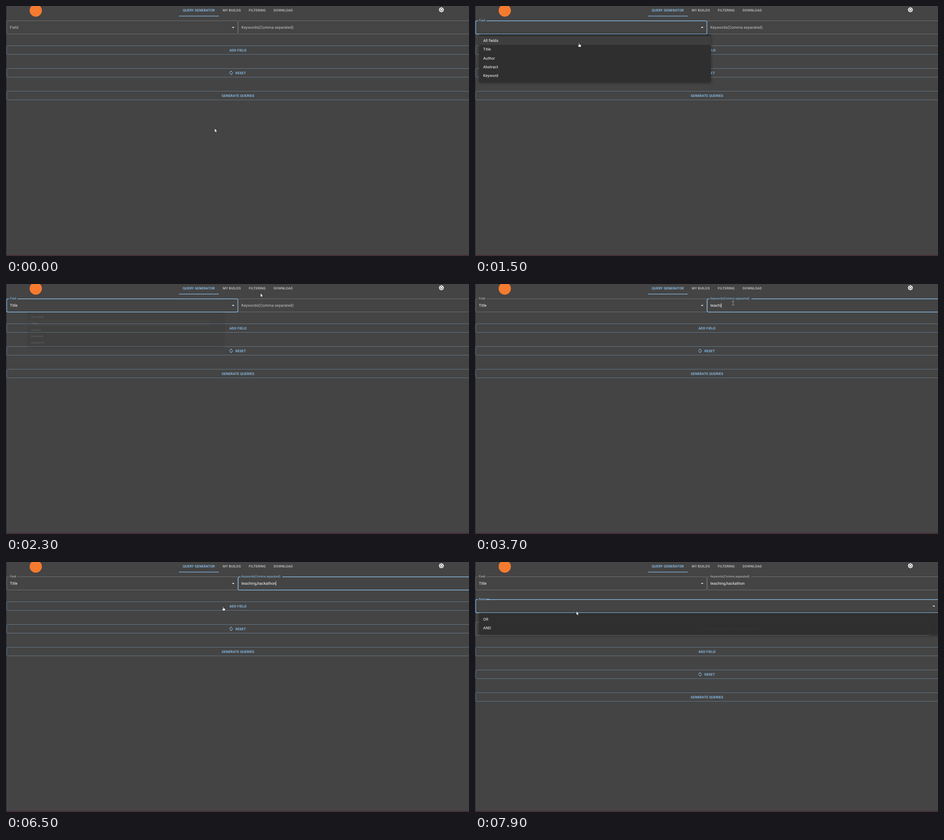
Write an HTML page that moves like this. It is 1019 px wide and 550 px high and loops after 8 s.

```html
<!DOCTYPE html>
<html lang="en">
<head>
<meta charset="utf-8">
<title>Query generator</title>
<style>
  html, body { margin: 0; width: 100%; height: 100%; overflow: hidden; background: #444; }
  svg { display: block; width: 1019px; height: 550px; }
  text { font-family: Roboto, sans-serif; font-size: 8.54px; letter-spacing: .00938em; text-rendering: geometricPrecision; }
  .caps { font-size: 7.47px; font-weight: 500; letter-spacing: .02857em; }
</style>
</head>
<body>
<svg id="stage" viewBox="0 0 1019 550"></svg>
<script>
const LOOP = 8000, STEP = 100, UNIT = .5335;
const BLUE = '#90caf9', GREY = '#c6c6c6', LINE = '#727272', BUTTON_LINE = '#647888';
const stage = document.getElementById('stage');

const ICONS = {
  brightness: 'M20 8.69V4h-4.69L12 .69 8.69 4H4v4.69L.69 12 4 15.31V20h4.69L12 23.31 15.31 20H20v-4.69L23.31 12 20 8.69zM12 18c-3.31 0-6-2.69-6-6s2.69-6 6-6 6 2.69 6 6-2.69 6-6 6zm0-10c-2.21 0-4 1.79-4 4s1.79 4 4 4 4-1.79 4-4-1.79-4-4-4z',
  renew: 'M12 6v3l4-4-4-4v3c-4.42 0-8 3.58-8 8 0 1.57.46 3.03 1.24 4.26L6.7 14.8c-.45-.83-.7-1.79-.7-2.8 0-3.31 2.69-6 6-6zm6.76 1.74L17.3 9.2c.44.84.7 1.79.7 2.8 0 3.31-2.69 6-6 6v-3l-4 4 4 4v-3c4.42 0 8-3.58 8-8 0-1.57-.46-3.03-1.24-4.26z',
  trash: 'M6 19c0 1.1.9 2 2 2h8c1.1 0 2-.9 2-2V7H6v12zM19 4h-3.5l-1-1h-5l-1 1H5v2h14V4z',
  drop: 'M7 10l5 5 5-5z'
};

const CURSORS = {
  arrow: '<path d="M0 0V9L2 7.2 3.3 10 4.8 9.4 3.6 6.6H6.2Z" fill="#fff" stroke="#111" stroke-width=".7"/>',
  hand: '<path d="M-.9.6Q0-.6.9.6V3.6L4 4.4Q5 4.8 4.8 6L4 9.2H-.6L-3.2 5.8Q-2.8 4.6-.9 6Z" fill="#fff" stroke="#111" stroke-width=".7"/>',
  beam: '<path d="M-2.6-4.3Q0-4.3 0-3.2Q0-4.3 2.6-4.3M0-3.4V3.6M-2.6 4.5Q0 4.5 0 3.4Q0 4.5 2.6 4.5" fill="none" stroke="#b4b4b4" stroke-width=".9"/>'
};

// time, x, y, pointer shape
const POINTER = [
  [0, 459, 269, 'arrow'], [500, 459, 269, 'arrow'], [600, 330, 165, 'arrow'], [700, 226, 47, 'hand'],
  [1000, 226, 47, 'hand'], [1100, 226, 48, 'arrow'], [1300, 227, 60, 'arrow'], [1400, 228, 72, 'hand'],
  [1500, 229, 81, 'hand'], [1600, 230, 91, 'hand'], [1700, 230, 95, 'hand'], [2000, 230, 95, 'hand'],
  [2100, 260, 88, 'arrow'], [2200, 440, 48, 'arrow'], [2300, 560, 20, 'arrow'], [2500, 560, 20, 'arrow'],
  [2600, 564, 29, 'arrow'], [2700, 567, 39, 'beam'], [2800, 568, 42, 'beam'], [5800, 568, 42, 'beam'],
  [5900, 544, 94, 'hand'], [6000, 541, 120, 'arrow'], [6100, 536, 168, 'arrow'], [6300, 514, 150, 'hand'],
  [6400, 492, 116, 'arrow'], [6500, 478, 98, 'hand'], [6600, 474, 96, 'hand'], [7000, 474, 96, 'hand'],
  [7500, 223, 98, 'hand'], [7600, 223, 98, 'hand'], [7700, 223, 103, 'hand'], [7800, 223, 108, 'arrow']
];

// time, number of characters
const TYPED = [
  [0, 0], [3200, 1], [3300, 2], [3400, 3], [3500, 4], [3600, 5], [3700, 6], [3900, 7], [4000, 8], [4100, 10],
  [4300, 12], [4500, 13], [4800, 12], [4900, 13], [5000, 15], [5200, 16], [5300, 17], [5400, 18]
];

const clamp = v => Math.max(0, Math.min(1, v));
const ramp = (t, from, to) => clamp((t - from) / (to - from));
const easeOut = p => 1 - (1 - p) ** 2;
const within = (t, from, to) => t >= from && t < to;
const latest = (keys, t) => keys.filter(k => k[0] <= t).pop();

function pointerAt(t) {
  const a = latest(POINTER, t), b = POINTER[POINTER.indexOf(a) + 1] || a;
  const p = a === b ? 0 : ramp(t, a[0], b[0]);
  return { x: a[1] + (b[1] - a[1]) * p, y: a[2] + (b[2] - a[2]) * p, shape: a[3] };
}

const text = (x, y, s, fill = '#fff', attrs = '') => `<text x="${x}" y="${y}" fill="${fill}" ${attrs}>${s}</text>`;
const caps = (x, y, s, fill, attrs = '') => text(x, y, s, fill, `class="caps" ${attrs}`);
const rect = (x, y, w, h, fill, attrs = '') => `<rect x="${x}" y="${y}" width="${w}" height="${h}" fill="${fill}" ${attrs}/>`;
const icon = (name, cx, cy, fill, scale = UNIT, turn = 0) =>
  `<path d="${ICONS[name]}" fill="${fill}" transform="translate(${cx} ${cy}) rotate(${turn}) scale(${scale}) translate(-12 -12)"/>`;

// Outlined input whose label shrinks into a notch of the border.
function field({ x, right, cy, label, notch, value = '', shrink = 0, gap = shrink, focus, hover, select, open }) {
  const top = cy - 14.5, left = x + 5;
  const color = focus ? BLUE : hover ? '#e6e6e6' : LINE;
  const border = `M${left + notch * gap} ${top}H${right - 2}q2 0 2 2v25q0 2-2 2H${x + 2}q-2 0-2-2v-25q0-2 2-2H${left}`;
  return `<path d="${border}" fill="none" stroke="${color}" stroke-width="${focus ? 1.25 : 1}"/>`
    + text(x + 7, cy + 3 - 15.6 * shrink, label, focus ? BLUE : GREY, `style="font-size:${8.54 - 2.14 * shrink}px"`)
    + text(x + 7, cy + 3.4, value, '#fff', 'class="value"')
    + (select ? icon('drop', right - 10.2, cy + (open ? -.1 : .2), '#fff', UNIT, open ? 180 : 0) : '');
}

function button(cy, label, hover) {
  const reset = label === 'RESET';
  return rect(1.5, cy - 9.5, 1020, 19, hover ? 'rgba(144,202,249,.08)' : 'none', `rx="2" stroke="${hover ? BLUE : BUTTON_LINE}"`)
    + (reset ? icon('renew', 495.4, cy, BLUE, .4446) : '')
    + (reset ? caps(505, cy + 2.7, label, BLUE) : caps(510.6, cy + 2.7, label, BLUE, 'text-anchor="middle"'));
}

function menu({ top, width, items, active = -1, activeWidth = width, opacity, grow }) {
  const cx = 9 + width / 2, sx = .75 + .25 * grow, sy = .5625 + .4375 * grow;
  const rows = items.map((s, i) =>
    (i === active ? rect(9, top + 4.3 + i * 19.3, activeWidth, 19.3, 'rgba(255,255,255,.07)') : '')
    + text(18, top + 17 + i * 19.3, s)).join('');
  return `<g opacity="${opacity}" transform="translate(${cx} ${top}) scale(${sx} ${sy}) translate(${-cx} ${-top})">`
    + rect(9, top, width, 8.6 + items.length * 19.3, '#2f2f2f', 'rx="2" style="filter:drop-shadow(0 2px 3px rgba(0,0,0,.4))"')
    + rows + '</g>';
}

function header() {
  const tabs = [[389, 'QUERY GENERATOR'], [477, 'MY BUILDS'], [534.3, 'FILTERING'], [589, 'DOWNLOAD']];
  return '<circle cx="65.5" cy="10" r="13.5" fill="#f47b30"/>'
    + tabs.map(([x, s], i) => caps(x, 11.7, s, i ? GREY : BLUE)).join('')
    + rect(380.7, 21.6, 87.6, 1.1, BLUE)
    + icon('brightness', 958.2, 8.2, '#fff');
}

function draw(t) {
  const pointer = pointerAt(t), lagged = pointerAt(Math.max(0, t - STEP));
  const added = t >= 6900, shift = added ? 100 : 0;
  const overButton = cy => within(t, 6000, 6900) && Math.abs(lagged.y - cy) < 10;
  const typed = 'teaching,hackathon'.slice(0, latest(TYPED, t)[1]);
  const typing = within(t, 3100, 6900);
  const shrink = easeOut(ramp(t, 950, 1200));

  let out = rect(0, 0, 1019, 550, '#444') + header()
    + field({ x: 1.5, right: 510.2, cy: 47, label: 'Field', notch: 18.5, select: true, shrink,
      value: t >= 2100 ? 'Title' : '', focus: within(t, 1000, 3100), hover: within(t, 700, 1000), open: within(t, 1000, 2100) })
    + '<g id="keywords">'
    + field({ x: 511, right: 1021, cy: 47, label: 'Keywords(Comma separated)', notch: 92.5, value: typed,
      shrink: easeOut(ramp(t, 3000, 3200)), focus: typing, hover: within(t, 2700, 3100) })
    + '</g>';

  if (added) {
    const open = t >= 7800;
    out += field({ x: 1.5, right: 1020, cy: 97, label: 'Relation', notch: 28.5, select: true, open, focus: open,
        hover: t >= 7000, shrink: easeOut(ramp(t, 7700, 7900)), gap: .65 * ramp(t, 7800, 7900) })
      + field({ x: 1.5, right: 500, cy: 147, label: 'Field', notch: 18.5, select: true })
      + field({ x: 500.6, right: 999.3, cy: 147, label: 'Keywords(Comma separated)', notch: 92.5 })
      + icon('trash', 1006, 147, '#111');
  }

  ['ADD FIELD', 'RESET', 'GENERATE QUERIES'].forEach((label, i) => {
    const cy = 97 + i * 50;
    out += button(cy + shift, label, overButton(cy));
  });

  if (typing) out += rect(518, 42.3, .8, 10, '#fff', 'id="caret"');

  if (within(t, 1000, 2400)) {
    const closing = t >= 2100, shown = easeOut(ramp(t, 950, 1250));
    out += menu({ top: 62, width: 510, items: ['All fields', 'Title', 'Author', 'Abstract', 'Keyword'],
      active: t < 1600 ? 0 : 1, activeWidth: closing ? 472 : 510,
      opacity: closing ? 1 - .85 * ramp(t, 2080, 2300) : shown,
      grow: closing ? 1 - .6 * ramp(t, 2200, 2300) : shown });
  }
  if (t >= 7800) {
    const shown = ramp(t, 7700, 7900);
    out += menu({ top: 112, width: 1020, items: ['OR', 'AND'], opacity: .96 * shown, grow: easeOut(shown) });
  }

  out += rect(0, 0, 1, 550, '#1b2444') + rect(1, 547.5, 1018, 2.5, '#443138')
    + `<g transform="translate(${pointer.x} ${pointer.y})">${CURSORS[pointer.shape]}</g>`;
  stage.innerHTML = out;

  if (typing && typed) {
    const input = stage.querySelector('#keywords .value');
    stage.querySelector('#caret').setAttribute('x', 518 + input.getComputedTextLength());
  }
}

let shownStep = -1;
function tick(now) {
  const step = Math.floor((now % LOOP) / STEP);
  if (step !== shownStep) draw((shownStep = step) * STEP);
  requestAnimationFrame(tick);
}
draw(0);
requestAnimationFrame(tick);
</script>
</body>
</html>
```
